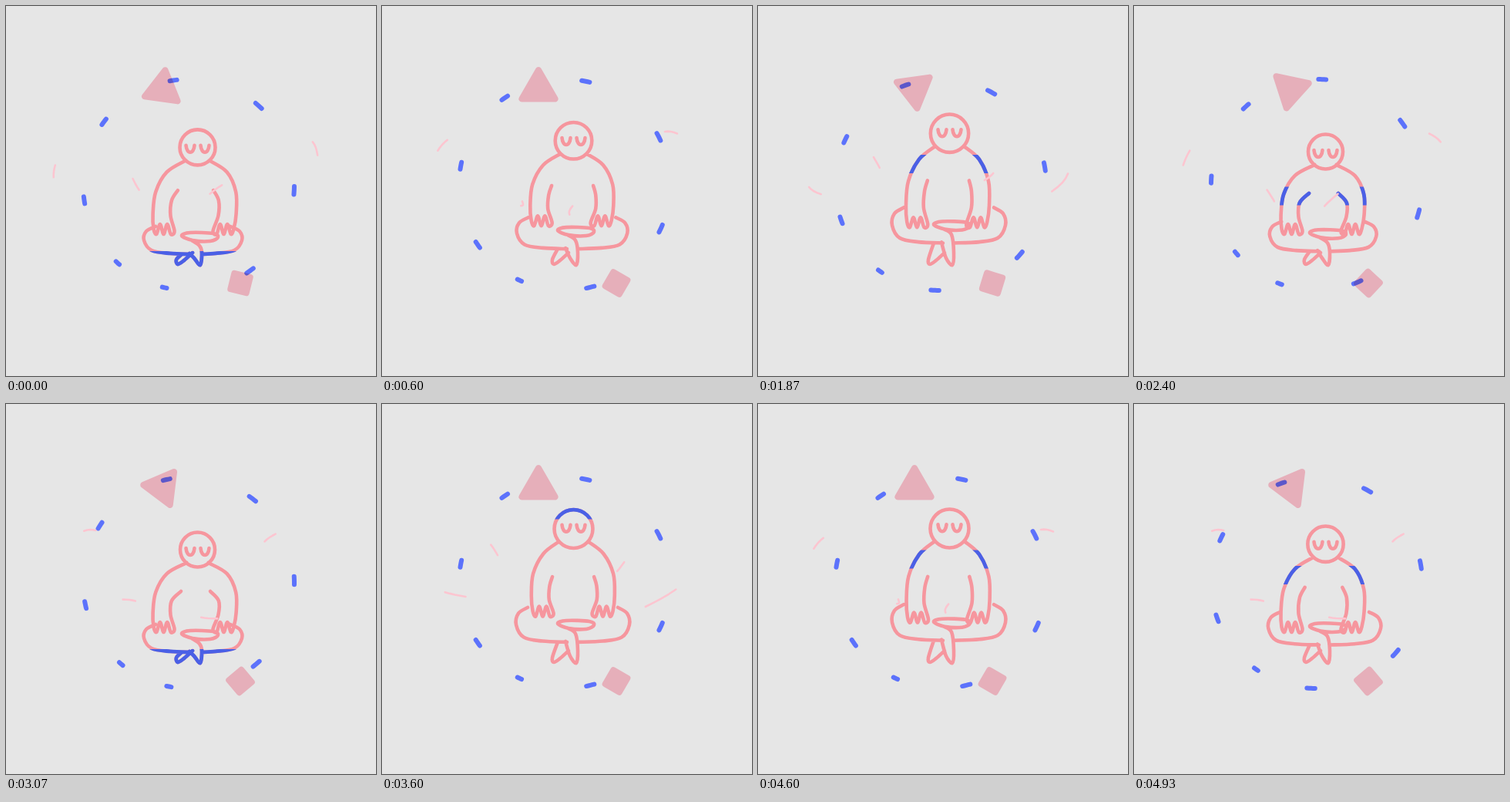
An HTML page with a canvas for the animation above (4990 ms loop, 480 by 480 pixels).

```html
<!DOCTYPE html>
<html lang="en">
<head>
<meta charset="utf-8">
<title>Meditation</title>
<style>
  html, body { margin: 0; height: 100%; overflow: hidden; background: #e6e6e6; }
  canvas { display: block; width: 100vmin; height: 100vmin; }
</style>
</head>
<body>
<canvas id="stage" width="480" height="480"></canvas>
<script>
const ctx = document.getElementById('stage').getContext('2d');
const LOOP = 4990, FRAMES = 75, BREATH = 42, BAND = 24;
const PINK = '#f6969e', PALE = '#fcc5d0', BLUE = '#4a60e6', BRIGHT = '#5c72fb', BLUSH = '#ffc2ce';
const RAD = Math.PI / 180;

// Two closed drifting paths, evenly spaced key points.
const swirls = [
  [[62, 215], [78, 180], [109, 163], [136, 177], [154, 203], [168, 231], [183, 258], [160, 254], [121, 252], [72, 240]],
  [[402, 184], [375, 163], [342, 173], [319, 199], [300, 222], [273, 237], [243, 266], [262, 278], [323, 271], [395, 229]]
];
const triangleTurns = [38, 102, 30, 82, 67];
const squareTurns = [-31, -2, -15, -28, 5];

const lerp = (a, b, k) => a + (b - a) * k;
const clamp = k => Math.min(1, Math.max(0, k));
const polar = (x, y, r, deg) => [x + r * Math.cos(deg * RAD), y + r * Math.sin(deg * RAD)];

function ease(from, to, t) {
  const k = clamp((t - from) / (to - from));
  return k * k * (3 - 2 * k);
}

// Point on a closed Catmull-Rom loop; u counts control points.
function onLoop(pts, u) {
  const n = pts.length, i = Math.floor(u), f = u - i;
  const [p0, p1, p2, p3] = [-1, 0, 1, 2].map(k => pts[(i + k + n) % n]);
  return [0, 1].map(d => {
    const a = p0[d], b = p1[d], c = p2[d], e = p3[d];
    return b + f * (c - a + f * (2 * a - 5 * b + 4 * c - e + f * (3 * (b - c) + e - a))) / 2;
  });
}

// Circle of dashes that bunch together at the lower left; u runs from 0 to 8.
function onRing(u) {
  u = (u + 8) % 8;
  const lead = 24 * Math.max(0, Math.min((u - 0.5) / 3.7, (5.6 - u) / 1.5));
  return polar(237, 232, 137, 45 * u + lead - 109.6);
}

// Smooth line through the points.
function curve(pts, closed) {
  const n = pts.length;
  const p = i => closed ? pts[(i + n) % n] : pts[Math.min(n - 1, Math.max(0, i))];
  ctx.moveTo(...pts[0]);
  for (let i = 0; i < (closed ? n : n - 1); i++) {
    const [a, b, c, d] = [p(i - 1), p(i), p(i + 1), p(i + 2)];
    ctx.bezierCurveTo(b[0] + (c[0] - a[0]) / 6, b[1] + (c[1] - a[1]) / 6,
      c[0] - (d[0] - b[0]) / 6, c[1] - (d[1] - b[1]) / 6, ...c);
  }
}

function stroke(color, width) {
  ctx.strokeStyle = color;
  ctx.lineWidth = width;
  ctx.stroke();
}

function dash(point, u, half, color, width) {
  ctx.beginPath();
  for (const d of [-1, -0.5, 0, 0.5, 1]) ctx.lineTo(...point(u + d * half));
  stroke(color, width);
}

function polygon(x, y, r, sides, turn) {
  const pts = Array.from({ length: sides }, (_, i) => polar(x, y, r, turn + i * 360 / sides));
  const last = pts[sides - 1];
  ctx.beginPath();
  ctx.moveTo((pts[0][0] + last[0]) / 2, (pts[0][1] + last[1]) / 2);
  pts.forEach((p, i) => ctx.arcTo(...p, ...pts[(i + 1) % sides], 4));
  ctx.closePath();
  ctx.fillStyle = BLUSH;
  ctx.fill();
}

function head(lift) {
  const y = 189 - 33 * lift, r = 22.5 + 3 * lift;
  ctx.ellipse(248.5, y, r, r, 0, 0, 7);
  for (const x of [233.5, 252.5]) {
    const top = y - 2 - 4 * lift;
    ctx.moveTo(x, top);
    ctx.bezierCurveTo(x + 1, top + 12, x + 10, top + 12, x + 11, top);
  }
  return y + 17;
}

function arm(side, neck, lift, reach) {
  const wrist = 264 + 25 * reach, elbow = lerp(243, 220, lift);
  const at = (dx, y, sway) => [248.5 + side * dx - 5 * reach * sway, y];
  const outer = [[lerp(14, 21, lift), 0], [39, 0.17], [52, 0.46], [54, 0.78], [52, 1]]
    .map(([dx, k]) => at(dx, lerp(neck, wrist, k), k));
  const fingers = [0, 1, 2, 3, 4]
    .map(i => at(lerp(52, 26, (i + 0.8) / 5.6), wrist + (i % 2 ? -6 : 7), 1));
  const inner = [[25, 0], [31, 0.38], [30.5, 0.75], [lerp(19, 27, clamp(3 * lift)), 1]]
    .map(([dx, k]) => at(dx, lerp(wrist + 3, elbow, k), 1 - k / 2));
  curve([...outer, ...fingers, ...inner]);
}

function legs(sit) {
  const top = lerp(259, 286, sit), floor = lerp(306, 322, sit), shin = lerp(283, 299, sit);
  for (const side of [-1, 1]) {
    const knee = side < 0 ? 174 + 5 * sit ** 3 : 321 - 15 * sit ** 3;
    const thigh = [[15, 0], [3, 0.17], [0, 0.5], [10, 0.86], [34, 0.97]]
      .map(([dx, k]) => [knee - side * dx, lerp(top, floor, k)]);
    curve([...thigh, [247 + side * 7, floor]]);
  }
  curve([[-23, -1], [-12, -5], [18, -4], [24, 1], [14, 6], [-9, 5]]
    .map(([dx, dy]) => [251 + dx, shin + dy]), true);
  curve([[241, shin + 5], [251, shin + 12], [254, 320], [252, 336], [244, 327], [238, floor - 1]]);
  curve([[228, floor], [221, 329], [223, 335], [231, 330], [242, 320]]);
}

function body(p) {
  const rise = ease(10, 21, p);
  const rebound = 0.17 * Math.sin(Math.PI * clamp(p / 10) ** 3);
  const lift = rise - ease(30, 41.5, p) + rebound;
  const reach = 1 - rise + ease(28, 38, p);
  const sit = ease(-11, 5, p) - rise + ease(31, 47, p);
  ctx.beginPath();
  const neck = head(lift);
  for (const side of [-1, 1]) arm(side, neck, lift, reach);
  legs(sit);
}

// Blue scan: slow over the chest, fast at both ends, resting at the feet.
function bandY(p) {
  const d = (p + BREATH - 13) % BREATH - 17;
  return Math.min(330, 192 + 3.1 * d + 0.01 * d ** 3);
}

function draw(now) {
  const frame = Math.floor((now % LOOP) * FRAMES / LOOP + 0.1) % FRAMES;
  const step = frame < 4 ? 0 : frame - 2; // short hold at the start
  ctx.fillStyle = '#e6e6e6';
  ctx.fillRect(0, 0, 480, 480);
  ctx.lineCap = ctx.lineJoin = 'round';

  const turn = 0.25 + Math.floor(step * 0.797 + 0.3) / 12;
  for (let k = 0; k < 8; k++) dash(onRing, k + turn, 0.0425, BRIGHT, 6);

  const pose = Math.floor(step / 3);
  ctx.globalCompositeOperation = 'multiply';
  polygon(203, 108, 33, 3, triangleTurns[pose % 5]);
  polygon(304, 359.5, 20.5, 4, squareTurns[pose % 5]);
  ctx.globalCompositeOperation = 'source-over';

  const breath = (step + 8) % BREATH;
  body(breath);
  stroke(PINK, 4.6);
  ctx.save();
  const band = new Path2D();
  band.rect(0, bandY(breath) - BAND / 2, 480, BAND);
  ctx.clip(band);
  stroke(BLUE, 4.8);
  ctx.restore();

  const drift = pose % 10 / 2;
  for (const loop of swirls)
    for (const u of [drift, drift + 5]) dash(v => onLoop(loop, v), u, 0.25, PALE, 2.6);

  requestAnimationFrame(draw);
}

requestAnimationFrame(draw);
</script>
</body>
</html>
```
